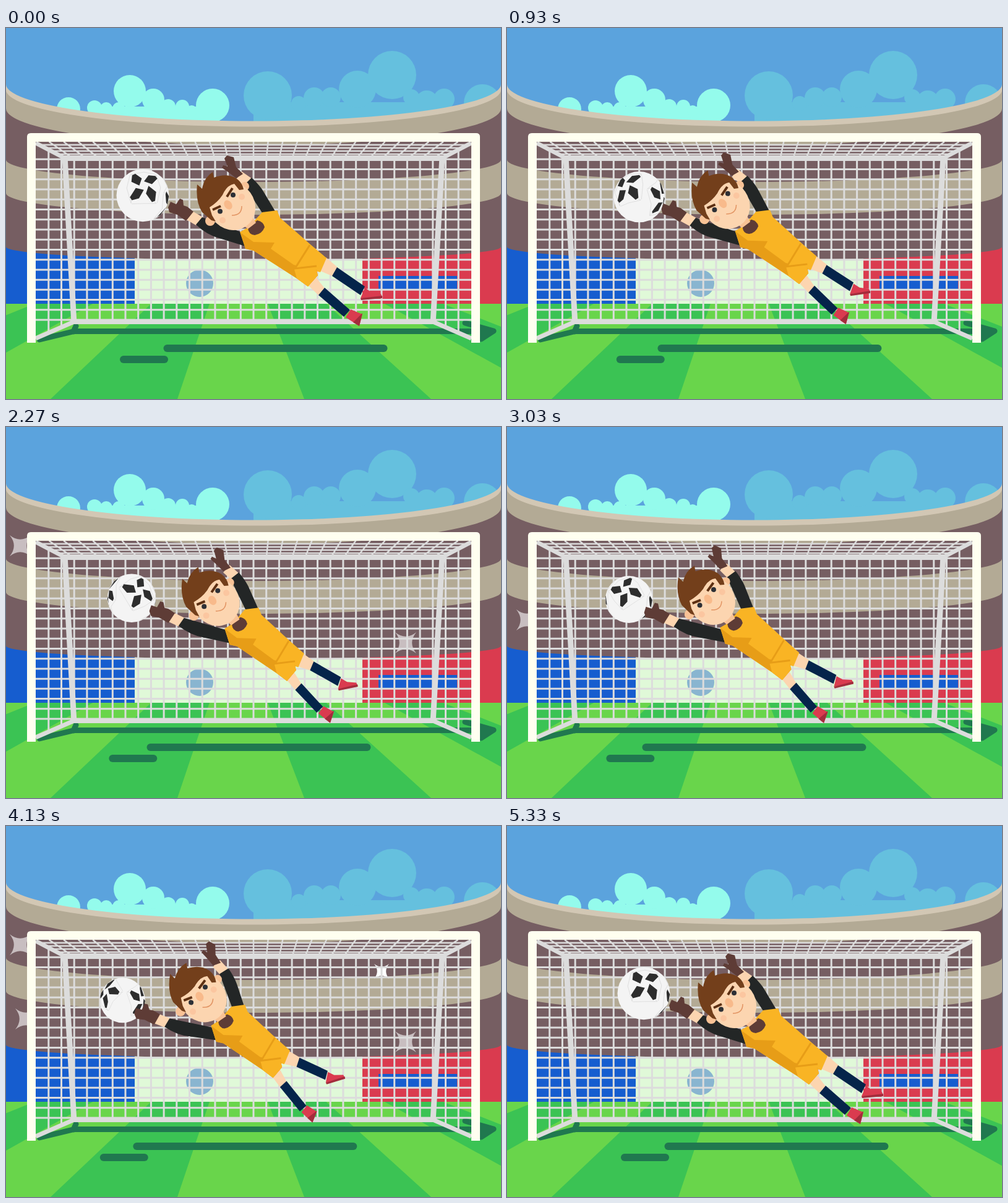
These frames come from a looping animation (800 by 600 pixels, 5360 ms). An HTML page:

```html
<!DOCTYPE html>
<html lang="en">
<head>
<meta charset="utf-8">
<title>Goalkeeper</title>
<style>
html, body { margin: 0; width: 100%; height: 100%; overflow: hidden; }
svg { display: block; width: 800px; height: 600px; }
</style>
</head>
<body>
<svg viewBox="0 0 800 600">
  <rect width="800" height="600" fill="#5ba3dd"/>
  <g id="clouds"></g>

  <!-- stands -->
  <g id="stands"></g>
  <path d="M0 354A400 21 0 0 0 208 372.400V447H0Z" fill="#165dcf"/>
  <path d="M208 372.400A400 21 0 0 0 576 372.900V447H208Z" fill="#e0f9d8"/>
  <path d="M576 372.900A400 21 0 0 0 800 354V447H576Z" fill="#da3b4f"/>
  <rect x="602" y="401" width="127" height="21" fill="#165dcf"/>
  <circle cx="313" cy="413" r="22" fill="#89b5d0"/>

  <!-- pitch -->
  <rect y="446" width="800" height="154" fill="#69d54b"/>
  <path id="stripes" fill="#3bc354"/>
  <g fill="none" stroke="#20784f" stroke-width="9" stroke-linecap="round" stroke-linejoin="round">
    <path d="M54 504L110 490.500H760M109 491L113 482"/>
    <path d="M742 477L788 490L768 503"/>
  </g>
  <path d="M765 482L792 490L765 506Z" fill="#20784f"/>
  <g id="sparks" fill="#fff"></g>

  <!-- goal -->
  <g fill="none" stroke="#dcdcdc">
    <path id="net" stroke-width="3"/>
    <path id="roof" stroke-width="2.500"/>
    <path d="M92 210.500H708" stroke-width="9"/>
    <path d="M95 208L110 478M705 208L690 478" stroke-width="9"/>
    <path d="M104 475H696" stroke-width="8"/>
    <path d="M48 186L96 211M752 186L704 211M48 502L110 475M752 502L690 475" stroke-width="7"/>
  </g>
  <path d="M34 509V176Q34 170 40 170H760Q766 170 766 176V509H752V184H48V509Z" fill="#fffff0"/>

  <g fill="#20784f">
    <rect id="bodyShadow" y="512" width="362" height="12" rx="6"/>
    <rect id="ballShadow" y="530" width="78" height="12" rx="6"/>
  </g>

  <g id="ball">
    <circle r="1" fill="#f4f4f4"/>
    <path id="seams" fill="none" stroke="#dadada" stroke-width=".02"/>
    <path id="patches" fill="#2d2d2d"/>
  </g>

  <g id="keeper">
    <g id="armLow">
      <path d="M318 306L301 296L290 309L307 319Z" fill="#fcd5b0"/>
      <path d="M390 334L317 306L307 318Q325 335 345 340L390 354Z" fill="#232626"/>
      <path d="M303 297L291 312L277 302L264 298L262 290L266 281L275 285L281 276L286 278L287 287L293 289Z" fill="#5e3c36"/>
    </g>
    <g id="armHigh">
      <path d="M386 255L372 245L381 232L398 244Z" fill="#fcd5b0"/>
      <path d="M416 302L385 254L397 242Q411 255 417 266L436 298Z" fill="#232626"/>
      <path d="M372 243L359 233L349 226L351 222L358 224L353 211L357 206L368 209L372 225L383 236Z" fill="#5e3c36"/>
    </g>
    <g id="body">
      <g id="legHigh">
        <path d="M506 380L517 371L536 387L527 401L508 393Z" fill="#fcd5b0"/>
        <path d="M535 387L580 418L573 432L527 401Z" fill="#05244a"/>
        <path d="M580 420L590 427L606 430L608 436L573 437Z" fill="#da3b4f"/>
        <path d="M573 437L608 433V437L574 440Z" fill="#a32c3c"/>
      </g>
      <g id="legLow">
        <path d="M484 412L497 398L515 421L505 432Z" fill="#fcd5b0"/>
        <path d="M515 420L556 456L546 467L505 432Z" fill="#05244a"/>
        <path d="M557 455L576 463L571 482L549 468Z" fill="#da3b4f"/>
        <path d="M576 461L571 482L561 476Z" fill="#a32c3c"/>
      </g>
      <path d="M414 298L438 295L443 307L492 350L518 372L508 395L497 392L504 400L488 418L470 405L400 360L387 357L378 330L392 322Z" fill="#f9b424"/>
      <path d="M379 331L400 346L434 347L428 357L465 383L478 386L468 391L502 391L504 400L488 418L470 405L400 360L387 357Z" fill="#e79d17"/>
      <path d="M466 391L478 368L500 386L504 400L488 418L470 405Z" fill="#f9b424"/>
      <path d="M491 351L467 389L502 385" fill="none" stroke="#e79d17" stroke-width="3"/>
      <path d="M391 324Q392 334 402 335Q414 333 418 322Q416 313 406 311Z" fill="#5e3c36"/>
    </g>
    <g id="head">
      <path d="M382 318L397 303L404 315L391 325Z" fill="#f8c296"/>
      <circle cx="330" cy="312" r="8" fill="#f8c296"/>
      <circle cx="386" cy="256" r="7" fill="#f8c296"/>
      <ellipse cx="365" cy="288" rx="37" ry="40" transform="rotate(-36 365 288)" fill="#fcd5b0"/>
      <path d="M339 313L332 311L317 298Q306 280 309 253L317 260Q320 242 334 233L336 242Q356 234 372 243Q382 250 384 261L377 262L369 252Q357 254 350 270Q342 282 329 290L333 303Z" fill="#733f1b"/>
      <g fill="none" stroke="#5d3013" stroke-width="4">
        <path d="M334 294L347 288M357 273L366 259"/>
      </g>
      <g fill="#2d3036"><circle cx="346" cy="296.500" r="4"/><circle cx="367" cy="270" r="4"/></g>
      <g fill="#fbc6a0"><circle cx="350" cy="311" r="5"/><circle cx="381" cy="273" r="5"/></g>
      <ellipse cx="359" cy="286" rx="6" ry="8" transform="rotate(-35 359 286)" fill="#f8ba8b"/>
      <path d="M365 303Q381 303 381 288" fill="none" stroke="#e29463" stroke-width="1.500"/>
    </g>
  </g>
</svg>
<script>
const LOOP = 5360, LAST = 5330;
const $ = id => document.getElementById(id);
const set = (id, name, value) => $(id).setAttribute(name, value);
const rad = Math.PI / 180;

// Scenery
const circles = (color, base, list) => {
  const [x, y, w, h] = base;
  return `<g fill="${color}"><rect x="${x}" y="${y}" width="${w}" height="${h}"/>` +
    list.map(([x, y, r]) => `<circle cx="${x}" cy="${y}" r="${r}"/>`).join('') + '</g>';
};
$('clouds').innerHTML =
  circles('#94fbec', [135, 127, 210, 30], [[101, 131, 19], [143, 129, 12], [162, 130, 10], [182, 130, 10],
    [200, 102, 26], [238, 116, 18], [262, 127, 12], [285, 127, 11], [300, 134, 9], [334, 125, 27]]) +
  circles('#65c0de', [400, 120, 308, 40], [[423, 109, 39], [473, 122, 12], [498, 113, 17], [525, 112, 16],
    [568, 99, 30], [624, 76, 39], [655, 112, 13], [680, 119, 18], [708, 115, 17], [770, 121, 30]]);

const tiers = [[91, 59.5, '#d2c7b4'], [100, 59.5, '#b3aa95'], [130, 60, '#765e62'], [213, 36, '#b3aa95'], [267, 35, '#765e62']];
$('stands').innerHTML = tiers.map(([y, ry, c]) =>
  `<path d="M0 ${y - 3}V${y}A400 ${ry} 0 0 0 800 ${y}V${y - 3}V450H0Z" fill="${c}"/>`).join('');

let d = '';
for (let x = -748; x < 1300; x += 410) {
  const far = v => 376 + (v - 379.5) * .46;
  d += `M${x} 600L${far(x)} 446H${far(x + 205)}L${x + 205} 600Z`;
}
set('stripes', 'd', d);

d = '';
let roof = '';
for (let k = -16; k <= 16; k++) {
  const x = 400 + k * 20.7, side = Math.max(0, Math.abs(k) - 14);
  d += `M${x} ${213 - side * 8}V${473 + side * 10}`;
  if (!side) roof += `M${x} 212L${400 + k * 23.6} 184`;
}
for (let i = -1; i < 16; i++) d += `M48 ${228.6 + i * 16.23}H752`;
for (let i = 0; i < 4; i++) roof += `M${58 + i * 9} ${189 + i * 5}H${742 - i * 9}`;
set('net', 'd', d);
set('roof', 'd', roof);

// Camera flashes: x, y, start times
const every = [370, 1300, 2230, 3160, 4090, 5020];
const flashes = [[23, 192, every], [646, 349, every], [32, 312, [1800, 2950, 3900]], [501, 326, [1560]], [607, 235, [4110]]];

function drawFlashes(ms) {
  $('sparks').innerHTML = flashes.map(([x, y, starts]) => {
    const age = ms - starts.find(s => ms >= s && ms < s + 270);
    if (!(age >= 0)) return '';
    const young = age < 30, r = young ? 12 : 17;
    return `<path transform="translate(${x} ${y}) scale(${r})" opacity="${young ? 1 : .6}"
      d="M-1-1Q0-.2 1-1Q.2 0 1 1Q0 .2-1 1Q-.2 0-1-1Z"/>`;
  }).join('');
}

// Ball: patches sit on a sphere turning around a tilted axis
const axis = [.2, -.9, -.38], front = [.08, -.37, .925], right = [.97, .22, 0];
const crosses = [[-2, 32], [101, 0], [215, 0]];
const patch = [[.13, -.12], [.5, -.2], [.76, .03], [.72, .17], [.28, .17]];

function onSphere(lon, lat) {
  const c = Math.cos(lat), s = Math.sin(lat);
  const p = axis.map((a, i) => c * (Math.cos(lon) * front[i] + Math.sin(lon) * right[i]) + s * a);
  const n = p[2] < 0 ? Math.hypot(p[0], p[1]) : 1;
  return { x: p[0] / n, y: p[1] / n, z: p[2] };
}

function outline(points, lon, roll) {
  const c = Math.cos(roll), s = Math.sin(roll);
  const pts = points.map(([u, v]) => onSphere(lon + u * c - v * s, -(u * s + v * c)));
  return pts.every(p => p.z < 0) ? '' : 'M' + pts.map(p => p.x.toFixed(3) + ' ' + p.y.toFixed(3)).join('L');
}

function drawBall(t) {
  let fill = '', seam = '';
  for (const [start, roll] of crosses) {
    const lon = (start - 38 * t) * rad;
    for (let arm = 0; arm < 4; arm++) {
      const turn = (roll + arm * 90) * rad;
      fill += outline(patch, lon, turn);
      seam += outline([[.7, .1], [.9, .02]], lon, turn) + outline([[.9, .02], [.5, .5], [.02, .9]], lon, turn);
    }
  }
  set('patches', 'd', fill);
  set('seams', 'd', seam);
  set('ball', 'transform', `translate(${221 - 7.9 * t} ${270.7 + 2.7 * t}) scale(${42.5 - 1.45 * t})`);
}

function drawKeeper(t) {
  const spin = (id, speed, x, y) => set(id, 'transform', `rotate(${speed * t} ${x} ${y})`);
  const shrink = 1 - Math.exp(-1.1 * t);
  set('keeper', 'transform', `translate(${-11.85 * t} ${-1.7 * t})`);
  set('body', 'transform',
    `translate(404 323) scale(${1 - .09 * shrink} ${1 - .04 * shrink}) translate(-404 -323)`);
  spin('head', 1, 404, 323);
  spin('armLow', -2.2, 392, 336);
  spin('armHigh', 3, 425, 292);
  spin('legHigh', -2.6, 520, 386);
  spin('legLow', 2.1, 491, 402);
}

function frame(now) {
  let ms = now % LOOP;
  if (ms >= LAST) ms = 0;
  const t = ms / 1000;
  set('bodyShadow', 'x', 254.5 - 11.9 * t);
  set('ballShadow', 'x', 184 - 7.8 * t);
  drawFlashes(ms);
  drawBall(t);
  drawKeeper(t);
  requestAnimationFrame(frame);
}
frame(0);
</script>
</body>
</html>
```
